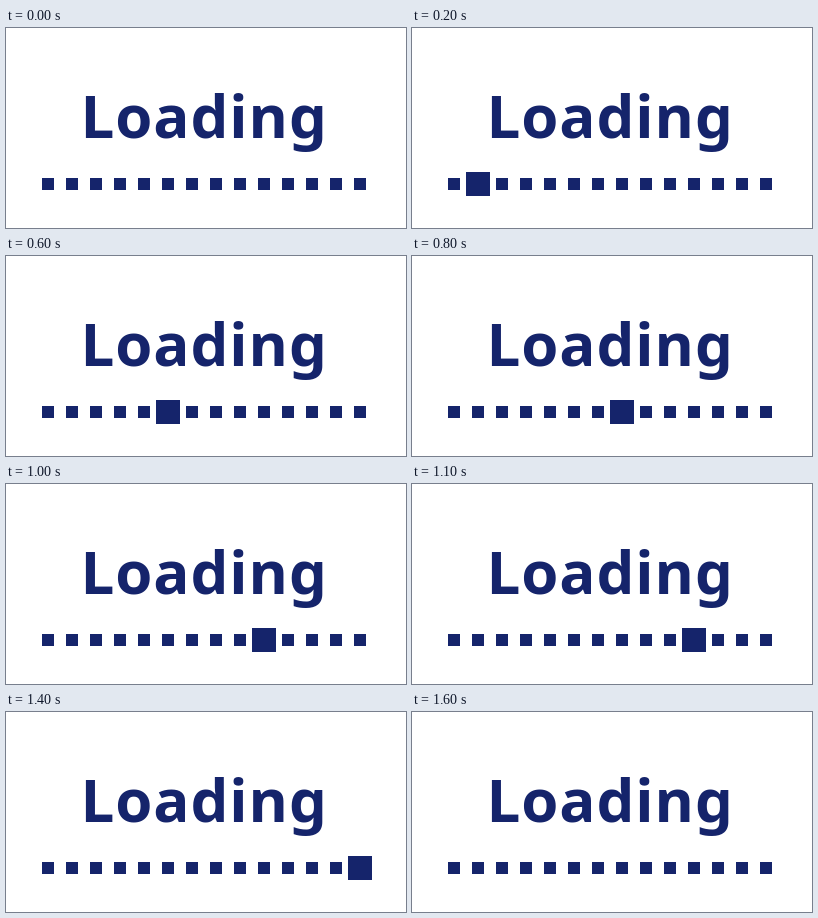
Animation, 400 px wide and 200 px high, one loop 1.7 s. Source, as an HTML page:

```html
<!DOCTYPE html>
<html lang="en">
<head>
<meta charset="utf-8">
<title>Loading</title>
<style>
  html, body { margin: 0; width: 100%; height: 100%; overflow: hidden; background: #fff; }
  svg { display: block; width: 400px; height: 200px; fill: #15246b; }
  text { font: bold 60px "Noto Sans", "Open Sans", sans-serif; letter-spacing: 0.9px; }
</style>
</head>
<body>
<svg viewBox="0 0 400 200">
  <text x="74.5" y="110">Loading</text>
  <g id="dots" shape-rendering="crispEdges"></g>
</svg>
<script>
  const LOOP = 1700, STEP = 100, COUNT = 14, PITCH = 24, SMALL = 12, BIG = 24;
  const FIRST_X = 42, CENTER_Y = 156;
  const group = document.getElementById("dots");

  const dots = Array.from({ length: COUNT }, () =>
    group.appendChild(document.createElementNS("http://www.w3.org/2000/svg", "rect")));

  function setSize(index, size) {
    const dot = dots[index];
    dot.setAttribute("x", FIRST_X + index * PITCH - size / 2);
    dot.setAttribute("y", CENTER_Y - size / 2);
    dot.setAttribute("width", size);
    dot.setAttribute("height", size);
  }

  // The last dot stays large for two steps; the row rests at both ends of the loop.
  function activeDot(time) {
    const step = Math.floor((time % LOOP) / STEP);
    return step < 1 || step > 15 ? -1 : Math.min(step - 1, COUNT - 1);
  }

  let shown;
  function draw(time) {
    const active = activeDot(time);
    if (active === shown) return;
    shown = active;
    dots.forEach((_, i) => setSize(i, i === active ? BIG : SMALL));
  }

  draw(0);
  const start = performance.now();
  requestAnimationFrame(function tick(now) {
    draw(Math.max(0, now - start));
    requestAnimationFrame(tick);
  });
</script>
</body>
</html>
```
